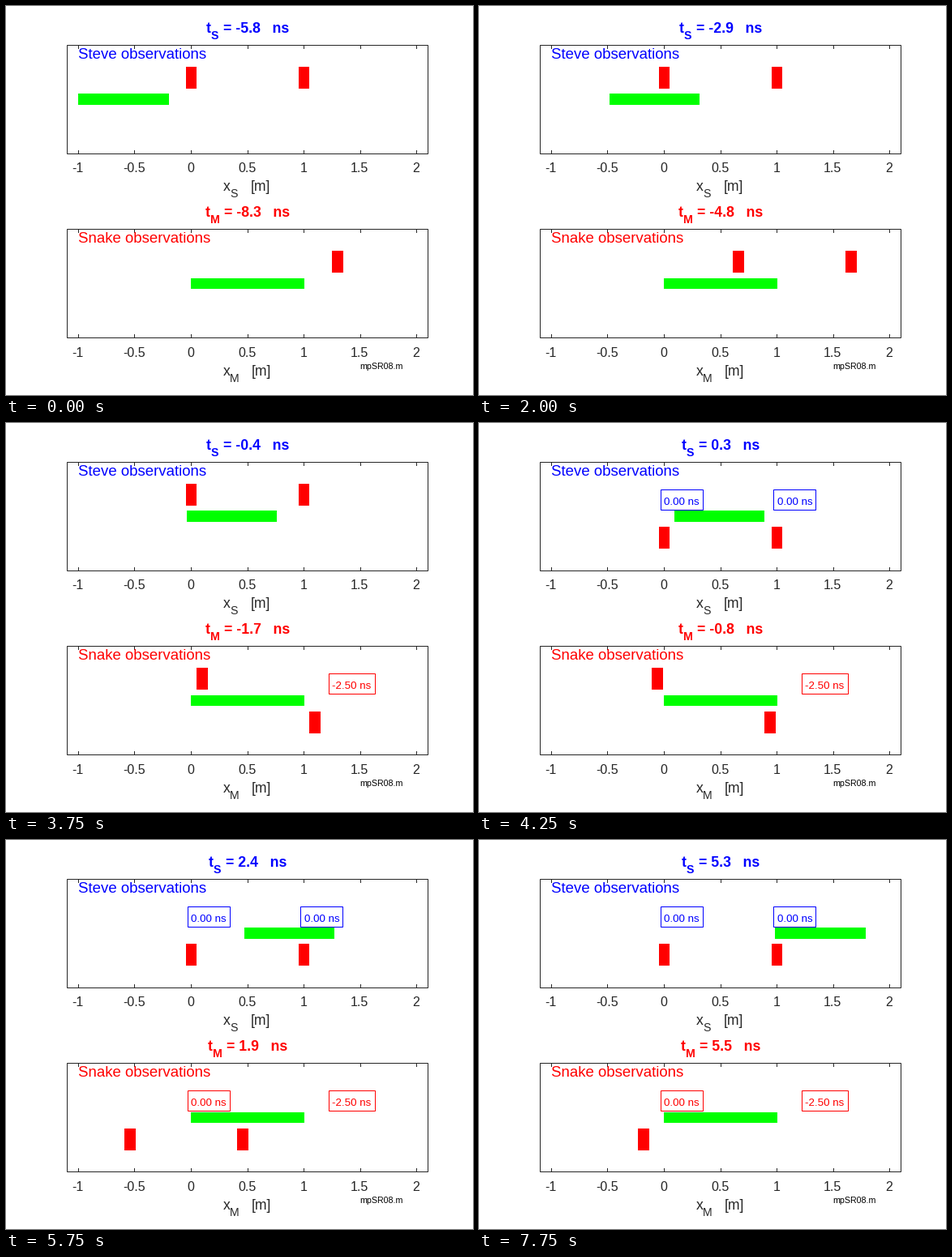
A matplotlib script for the animation above (8 s loop, 576 by 480 pixels).

```python
import matplotlib.pyplot as plt
from matplotlib.animation import FuncAnimation
from matplotlib.patches import Rectangle

W, H, DPI = 576, 480, 96
FRAMES, INTERVAL = 32, 250

plt.rcParams["font.family"] = "Liberation Sans"
BLUE, RED, GREEN, DARK = "#0000ff", "#ff0000", "#00ff00", "#262626"

# Panel geometry in pixels, shared by both panels
LEFT, RIGHT, TOP, BOTTOM = 75.5, 520.5, 48.5, 182.5
X_MIN, X_MAX = -1.1, 2.1
SCALE = (RIGHT - LEFT) / (X_MAX - X_MIN)
PANEL_STEP = 227
BAR = 10 * DPI / 72
LABEL_SIZE = 13.2
SUB_SIZE = 0.8 * LABEL_SIZE

SPEED = 0.18        # m per ns
STEP_S = 0.064 / SPEED
STEP_M = 0.08 / SPEED

fig = plt.figure(figsize=(W / DPI, H / DPI), dpi=DPI, facecolor="white")
ax = fig.add_axes([0, 0, 1, 1])
ax.set_xlim(0, W)
ax.set_ylim(H, 0)
ax.axis("off")


def px(x):
    return LEFT + (x - X_MIN) * SCALE


def label(x, y, text, size, color, ha="left", weight="normal", z=4):
    return ax.text(x, y, text, fontsize=size, color=color, ha=ha,
                   va="baseline", weight=weight, zorder=z)


def block(x, y, w, h, color):
    return ax.add_patch(Rectangle((x, y), w, h, fc=color, lw=0,
                                  snap=True, zorder=3))


def frame(x, y, w, h, color, z):
    return ax.add_patch(Rectangle((x, y), w, h, fc="white", ec=color,
                                  lw=0.75, snap=False, zorder=z))


def tick(x, y0, y1):
    ax.plot([x, x], [y0, y1], color=DARK, lw=0.75, snap=False,
            solid_capstyle="butt", zorder=2)


class Tag:
    """Framed time label that shows up when a blade drops."""

    def __init__(self, x, y, width, text, color):
        self.parts = [
            frame(int(px(x)) - 3.5, y, width, 25, color, 5),
            label(px(x), y + 18.5, text, 10, color, z=6),
        ]

    def show(self, on):
        for part in self.parts:
            part.set_visible(on)


class Panel:
    def __init__(self, dy, text_dy, blade_ys, letter, heading, color, half):
        self.half = half
        self.blade_ys = blade_ys
        frame(LEFT, TOP + dy, RIGHT - LEFT, BOTTOM - TOP, DARK, 1)
        for i in range(-2, 5):
            x = int(px(i / 2)) + 0.5
            tick(x, TOP + dy, TOP + dy + 4.5)
            tick(x, BOTTOM + dy - 4.5, BOTTOM + dy)
            label(px(i / 2) - 0.7, 205 + text_dy, f"{i / 2:g}", 12, DARK,
                  "center")

        label(89, 65 + dy, heading, 14, color)
        label(267.5, 228 + text_dy, "x", LABEL_SIZE, DARK)
        label(276.3, 236 + text_dy, letter, SUB_SIZE, DARK)
        label(275 + half, 228 + text_dy, "[m]", LABEL_SIZE, DARK, "right")

        bold = dict(color=color, weight="bold")
        self.t = label(0, 33 + dy, "t", LABEL_SIZE, **bold)
        self.sub = label(0, 41 + dy, letter, SUB_SIZE, **bold)
        self.tail = label(0, 33 + dy, "", LABEL_SIZE, ha="right", **bold)
        self.blades = [block(0, 0, BAR, 27, RED) for _ in range(2)]

    def set_time(self, t):
        half = self.half - (3 if t >= 0 else 0)   # no minus sign
        self.t.set_x(298 - half)
        self.sub.set_x(298 - half + 5.9)
        self.tail.set_x(298 + half)
        self.tail.set_text(f"= {t:.1f}   ns")

    def set_blade(self, i, x, dropped):
        blade = self.blades[i]
        blade.set_xy((px(x) - BAR / 2, self.blade_ys[dropped]))
        blade.set_visible(X_MIN <= x <= X_MAX)


steve = Panel(0, 0, (75, 128), "S", "Steve observations", BLUE, 51)
snake = Panel(PANEL_STEP, PANEL_STEP + 1, (302, 356), "M",
              "Snake observations", RED, 52)
label(436.4, 448, "mpSR08.m", 8, "black")

body_s = block(0, 108, 0.8 * SCALE, 14, GREEN)
block(px(0), 336, SCALE, 13, GREEN)

tags_s = [Tag(x, 82.5, 52, "0.00 ns", BLUE) for x in (0, 1)]
tag_left = Tag(0, 309.5, 52, "0.00 ns", RED)
tag_right = Tag(1.25, 309.5, 57, "-2.50 ns", RED)


def draw(k):
    t_s = -5.767 + k * STEP_S
    t_m = -8.322 + k * STEP_M

    steve.set_time(t_s)
    body_s.set_x(px(-1 + 0.064 * k))
    for i in range(2):
        steve.set_blade(i, i, t_s >= 0)
        tags_s[i].show(t_s >= 0)

    snake.set_time(t_m)
    right = 0.8 - SPEED * t_m
    snake.set_blade(0, right - 1, t_m >= 0)
    snake.set_blade(1, right, t_m >= -2.5)
    tag_left.show(t_m >= 0)
    tag_right.show(t_m >= -2.5)
    return []


anim = FuncAnimation(fig, draw, frames=FRAMES, interval=INTERVAL,
                     init_func=lambda: draw(0), repeat=True, repeat_delay=0,
                     blit=False)
plt.show()
```
